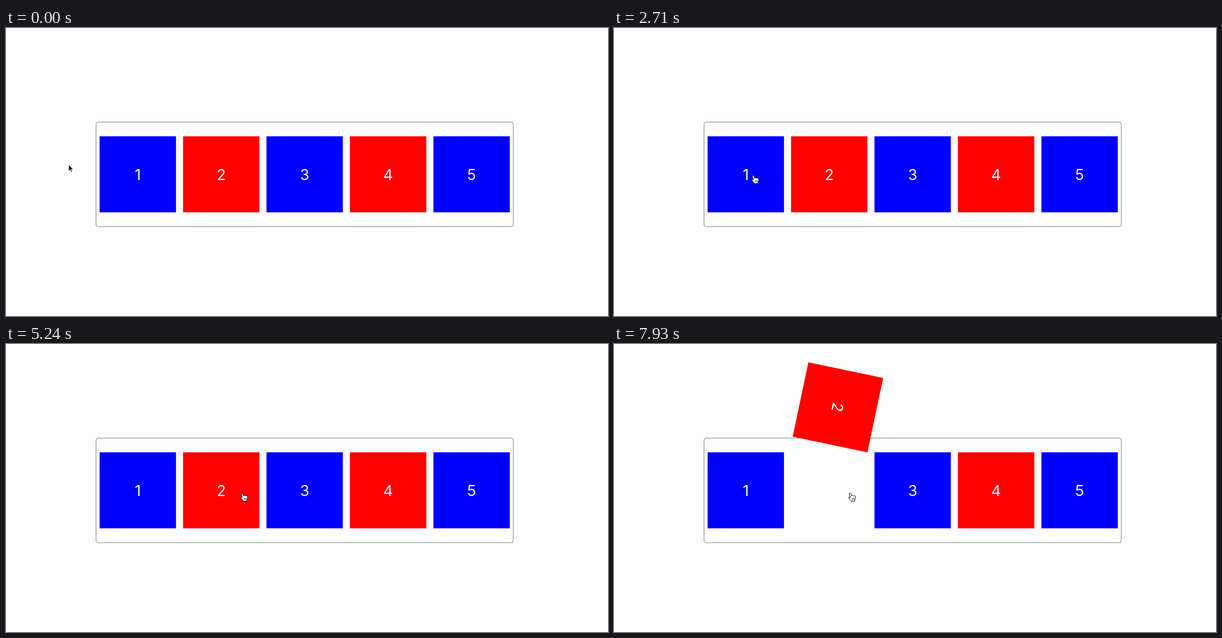
An HTML page that plays this animation: 1080x519 px, repeating every 8 s.

```html
<!DOCTYPE html>
<html lang="en">
<head>
<meta charset="utf-8">
<title>Rotating boxes</title>
<style>
  html, body { margin: 0; width: 100%; height: 100%; overflow: hidden; background: #fefefe; }
  svg { display: block; width: 100%; height: 100%; }
  text { font: 27px Inter, Arial, sans-serif; fill: #fff; text-anchor: middle; }
</style>
</head>
<body>
<svg viewBox="0 0 1080 519">
  <rect x="161.5" y="169.5" width="748.5" height="188.5" rx="4" fill="none" stroke="#808080"/>
  <g id="boxes"></g>
  <g id="cursor">
    <path id="arrow" d="M0 0V11.5L2.7 9 4.6 13.2 6.4 12.4 4.6 8.3H8.2Z" stroke="#fff" stroke-width=".8"/>
    <g id="hand" transform="translate(-3.5 -1)" stroke="#000" stroke-linejoin="round">
      <path fill="#fff" d="M2.2 1.2C3.2 .2 4.4 .8 4.8 2L6 5.4C7 4.4 8.2 4.7 8.6 5.4 9.4 4.6 10.6 5 10.9 5.9 12 5.3 13 6 13.1 7.2 13.3 9.5 13 11 12 12.6L11.8 15 5.8 15.5 5.4 14.2C4 13 2.4 11.2 1.2 9.6 .2 8.4 1.4 7.3 2.6 8L4 9 2 3Q1.6 1.9 2.2 1.2Z"/>
      <path fill="none" stroke-width=".8" d="M7.2 9.8v3M9 9.6v3M10.8 9.5v3"/>
    </g>
  </g>
</svg>
<script>
const LOOP = 8000, TURN = 1000, STEP = 150, SLACK = 10;
const SIZE = 137, TOP = 195.2;
const $ = id => document.getElementById(id);
const left = i => 167.9 + 149.72 * i;

// One full linear turn each; lead is the age at the first visible step
const turns = [
  { box: 0, first: 1660, lead: 38, dir: 1 },
  { box: 0, first: 3460, lead: 117, dir: -1 },
  { box: 1, first: 5540, lead: 117, dir: 1 },
  { box: 1, first: 7330, lead: 117, dir: -1 }
];

// Pointer moves by its hot spot
const home = [112.4, 246.4];
const moves = [
  { first: 600, steps: 5, to: [249.8, 266], overshoot: 1.6 },
  { first: 4800, steps: 4, to: [423.6, 269], overshoot: 0 }
];

const boxes = [0, 1, 2, 3, 4].map(i => {
  const box = document.createElementNS("http://www.w3.org/2000/svg", "g");
  box.innerHTML = `<rect x="${left(i)}" y="${TOP}" width="${SIZE}" height="${SIZE}" fill="${i % 2 ? "#f00" : "#00f"}"/>
    <text x="${left(i) + SIZE / 2}" y="274">${i + 1}</text>`;
  $("boxes").append(box);
  return box;
});

// The picture refreshes every STEP, counted from the start of each action
const stepsSince = (first, t) => Math.floor((t - first + SLACK) / STEP);

const ease = (p, overshoot) => p * p * (3 - 2 * p) + overshoot * p ** 3 * (1 - p);

function drawBoxes(t) {
  boxes.forEach(box => box.removeAttribute("transform"));
  for (const { box, first, lead, dir } of turns) {
    const k = stepsSince(first, t), age = lead + k * STEP;
    if (k < 0 || age >= TURN) continue;
    const pivot = left(box) + box * SIZE; // box 1 hangs on its left corner, box 2 on its right
    boxes[box].setAttribute("transform", `rotate(${dir * 360 * age / TURN} ${pivot} ${TOP})`);
    if ($("boxes").lastChild !== boxes[box]) $("boxes").append(boxes[box]);
  }
}

function drawPointer(t) {
  let pos = home;
  for (const { first, steps, to, overshoot } of moves) {
    const p = Math.min(1, Math.max(0, (stepsSince(first, t) + 1) / steps));
    pos = pos.map((from, i) => from + (to[i] - from) * ease(p, overshoot));
  }
  const [x, y] = pos;
  const over = boxes.some((_, i) => x >= left(i) && x <= left(i) + SIZE);
  $("cursor").setAttribute("transform", `translate(${x} ${y})`);
  $("hand").style.display = over ? "" : "none";
  $("arrow").style.display = over ? "none" : "";
}

let begin;
function tick(now) {
  begin ??= now;
  const t = (now - begin) % LOOP;
  drawBoxes(t);
  drawPointer(t);
  requestAnimationFrame(tick);
}
requestAnimationFrame(tick);
</script>
</body>
</html>
```
